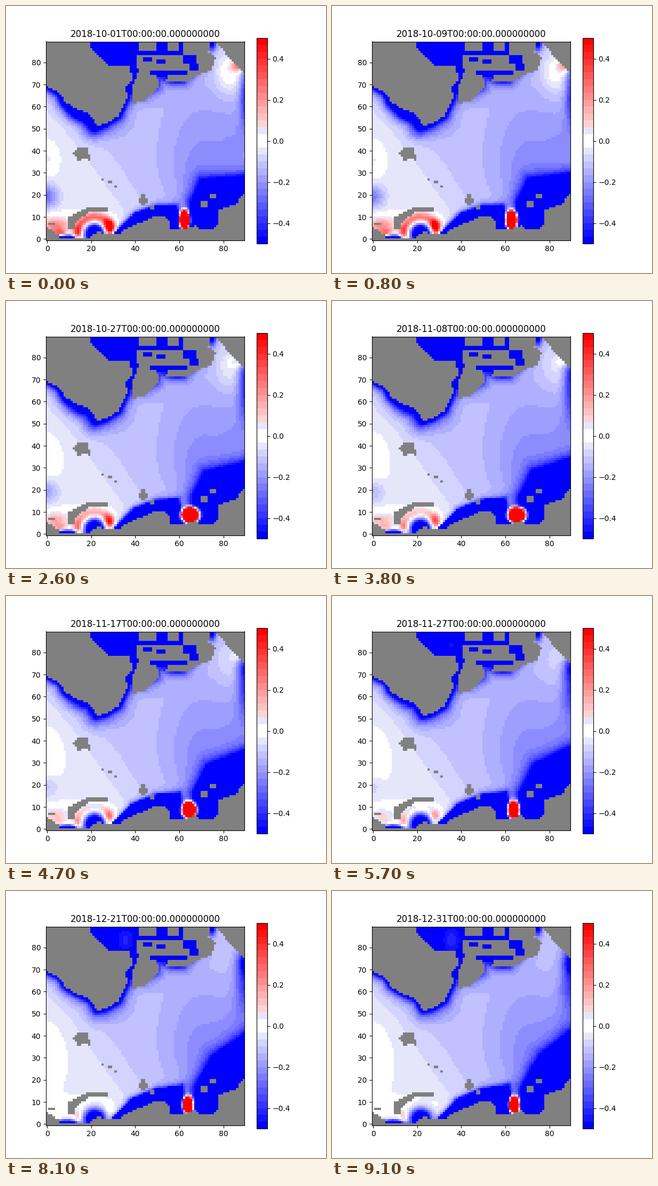
Write a matplotlib script that moves like this. It is 600 px wide and 500 px high and loops after 9200 ms.

```python
import numpy as np
import matplotlib.pyplot as plt
from matplotlib.animation import FuncAnimation
from matplotlib.colors import ListedColormap
from matplotlib.path import Path

plt.rcParams["text.kerning_factor"] = 6

N, DAYS = 90, 92
X, Y = np.meshgrid(np.arange(N) + 0.5, np.arange(N) + 0.5)
CELLS = np.column_stack([X.ravel(), Y.ravel()])


def inside(points):
    return Path(points).contains_points(CELLS).reshape(N, N)


def box(x0, y0, x1, y1):
    return (X > x0) & (Y > y0) & (X < x1) & (Y < y1)


def distance(points):
    """Distance from every cell to a polygon, zero inside it."""
    points = np.asarray(points, float)
    best = np.full(len(CELLS), np.inf)
    for a, b in zip(points, np.roll(points, -1, axis=0)):
        ab = b - a
        s = np.clip((CELLS - a) @ ab / (ab @ ab), 0, 1)
        best = np.minimum(best, np.hypot(*(CELLS - a - s[:, None] * ab).T))
    return np.where(inside(points), 0, best.reshape(N, N))


def mix(p, start, end):
    return (1 - p) * np.asarray(start) + p * np.asarray(end)


def spot(cx, cy, rx, ry):
    return np.exp(-((X - cx) / rx) ** 2 - ((Y - cy) / ry) ** 2)


def step(z):
    return 1 / (1 + np.exp(-z))


# Key points of the coastlines, in grid cells
NORTHWEST = [
    (0, 90), (20, 90), (20, 88), (22, 86), (29, 79), (38, 79), (39, 73), (36, 69),
    (37, 65), (33, 56.5), (27, 53), (23, 52), (20, 57), (13, 60), (8.5, 63), (6, 67),
    (0, 70)]
ARCHIPELAGO = [
    (42, 90), (74, 90), (73.5, 85.5), (77, 83), (75, 77), (69, 75), (63, 71.5),
    (57, 72), (51.5, 73), (51, 69), (45, 63.5), (38.5, 62), (38.5, 68), (42, 77),
    (41, 79)]
NORTHEAST = [(77, 90), (81, 85), (84, 81), (90, 76), (90, 90)]
SOUTH = [
    (0, 6), (6, 2.5), (6, 1), (18, 0.5), (24, 4.5), (26, 3), (33, 3), (37, 5.5),
    (49, 11), (54, 11), (56.5, 8.5), (55.5, 5), (63, 5), (68, 7), (69, 5), (76, 5),
    (78, 8), (78, 14), (86, 16.5), (90, 22), (90, 0), (0, 0)]
HOOK = [
    (10, 5), (10, 10.5), (18, 14.5), (28, 15), (28, 13), (19, 12.5), (13, 8), (13, 5)]
WEST_ISLE = [
    (11, 39), (15.5, 42.3), (18.5, 42), (20.5, 36), (17, 37), (14, 35.2), (14, 38.3)]
SOUTH_ISLE = [(43.4, 21.5), (45, 21), (46, 17), (44, 15.5), (42, 18)]
ISLETS = [
    (1, 7, 4, 8), (47, 14, 49, 16), (25, 27, 26, 28), (28, 26, 30, 27),
    (31, 24, 32, 25), (70, 15, 73, 18), (74, 19, 77, 21)]
CHANNELS = [
    (41, 84, 62, 86), (50, 86, 55, 90), (60, 86, 62, 90), (44, 81, 48, 83),
    (50, 80, 54, 82), (62, 80, 68, 84), (65, 77, 69, 80), (47, 75, 64, 77),
    (50, 73, 55, 75)]
WATERWAYS = inside([
    (19, 90), (73, 90), (70, 76), (63, 73), (52, 74), (44, 76), (39, 66), (37, 66),
    (35, 79), (28, 79)])

LAND = inside(ARCHIPELAGO)
for channel in CHANNELS:
    LAND &= ~box(*channel)
for shape in (NORTHWEST, NORTHEAST, SOUTH, HOOK, WEST_ISLE, SOUTH_ISLE):
    LAND |= inside(shape)
for islet in ISLETS:
    LAND |= box(*islet)

# Cold shelves at the first and last day
SHELF = (
    [(65.3, 0), (65.3, 18), (70, 27.5), (90, 29.5), (90, 0)],
    [(67, 0), (67, 17), (76, 32), (90, 43), (90, 0)])
COAST = (
    [(30, 3), (40, 12.5), (50, 16), (59, 16), (62, 4)],
    [(30, 3), (38, 12), (50, 17), (62, 18.5), (64, 4)])

NORTHWEST_GAP = distance(NORTHWEST)
ARCHIPELAGO_GAP = distance(ARCHIPELAGO)
BAY = np.exp(-((X - 15) / 8) ** 2 - (NORTHWEST_GAP / 5) ** 2)
POND = np.hypot(X - 22, Y - 3)

# Steady part: levels fall eastward, with a trough in the east
BASE = -0.045 - 0.07 * step((X + 0.7 * (Y - 22) - 34) / 6)
BASE -= 0.07 * spot(70, 46, 16, 22) + 0.04 * spot(68, 30, 14, 14)
BASE -= 0.06 * spot(88, 45, 10, 16) + 0.05 * spot(28, 51, 9, 5)
BASE -= 0.6 * np.exp(-NORTHWEST_GAP / 1.9)
BASE -= 0.35 * np.exp(-((X - 57) / 10) ** 2 - ARCHIPELAGO_GAP / 1.8)
BASE -= 0.4 * spot(75, 89, 2, 3)
BASE += 0.05 * spot(18, 8, 16, 5)
BASE -= 0.9 * np.exp(-(POND / 4.3) ** 2) + 0.95 * spot(9.5, 1, 4.5, 1.4)


def river_plume(day, p):
    swell = np.exp(-((day - 32) / 18) ** 2)
    cx = 62.5 + 2.6 * swell + 1.8 * p
    rx, ry = 2.3 + 2.1 * swell, 4.6 - swell - 0.6 * p
    q = ((X - cx) / rx) ** 2 + ((Y - 9.3) / ry) ** 2
    return np.exp(-q ** 2)


def field(day):
    p = day / (DAYS - 1)
    fade = (1 - p) ** 1.5
    v = BASE - 0.6 * fade * BAY

    # Western edge
    v += mix(p, .09, .055) * spot(0, mix(p, 37, 30), mix(p, 5, 9), mix(p, 7, 16))
    v -= 0.24 * fade * spot(0, 20, 5, 5)

    # Eastern edge
    v += fade * (0.14 * spot(83, 76, 6, 9) + 0.3 * spot(87, 79, 3, 2.5))
    v -= 0.25 * spot(90, 66, mix(p, 2.5, 4.5), 14) + 0.3 * p * spot(90, 74, 3, 5)

    # Warm inflow in the southwest
    v += (1 - p) * (0.27 * spot(4, 6.5, 6, 4) + 0.5 * spot(28.5, 6.5, 2.5, 3))
    v += 0.25 * fade * spot(6.5, 3.5, 3, 1.5) + 0.15 * spot(14.5, 4, 2, 3)
    v += 0.33 * fade * np.exp(-((POND - 7.5) / 2.5) ** 2) * (Y < 14)

    shelf = distance(mix(p, *SHELF))
    v = np.where(shelf > 0, v - 0.32 * np.exp(-shelf / 2.7), -0.55)
    coast = distance(mix(p, *COAST))
    v = np.where(coast > 0, v - 0.3 * np.exp(-coast / 0.9), -0.55)

    v = mix(river_plume(day, p), v, 1.3)
    v = np.where(WATERWAYS, -0.55 + 0.14 * p * spot(36, 84, 5, 7), v)
    return np.ma.masked_array(v, LAND)


colors = plt.get_cmap("bwr", 30)(np.arange(30))
colors[14:16, :3] = 1
colors[[13, 16], :3] = 0.902, 0.902, 0.985
cmap = ListedColormap(colors)
cmap.set_bad("gray")

fig, ax = plt.subplots(figsize=(6, 5), dpi=100)
image = ax.imshow(field(0), origin="lower", cmap=cmap, vmin=-0.5, vmax=0.5)
fig.colorbar(image)
title = ax.set_title("")


def draw(day):
    image.set_data(field(day))
    date = np.datetime64("2018-10-01") + day
    title.set_text(f"{date}T00:00:00.000000000")
    return image, title


anim = FuncAnimation(fig, draw, frames=DAYS, interval=100, repeat=True, repeat_delay=0)
plt.show()
```
